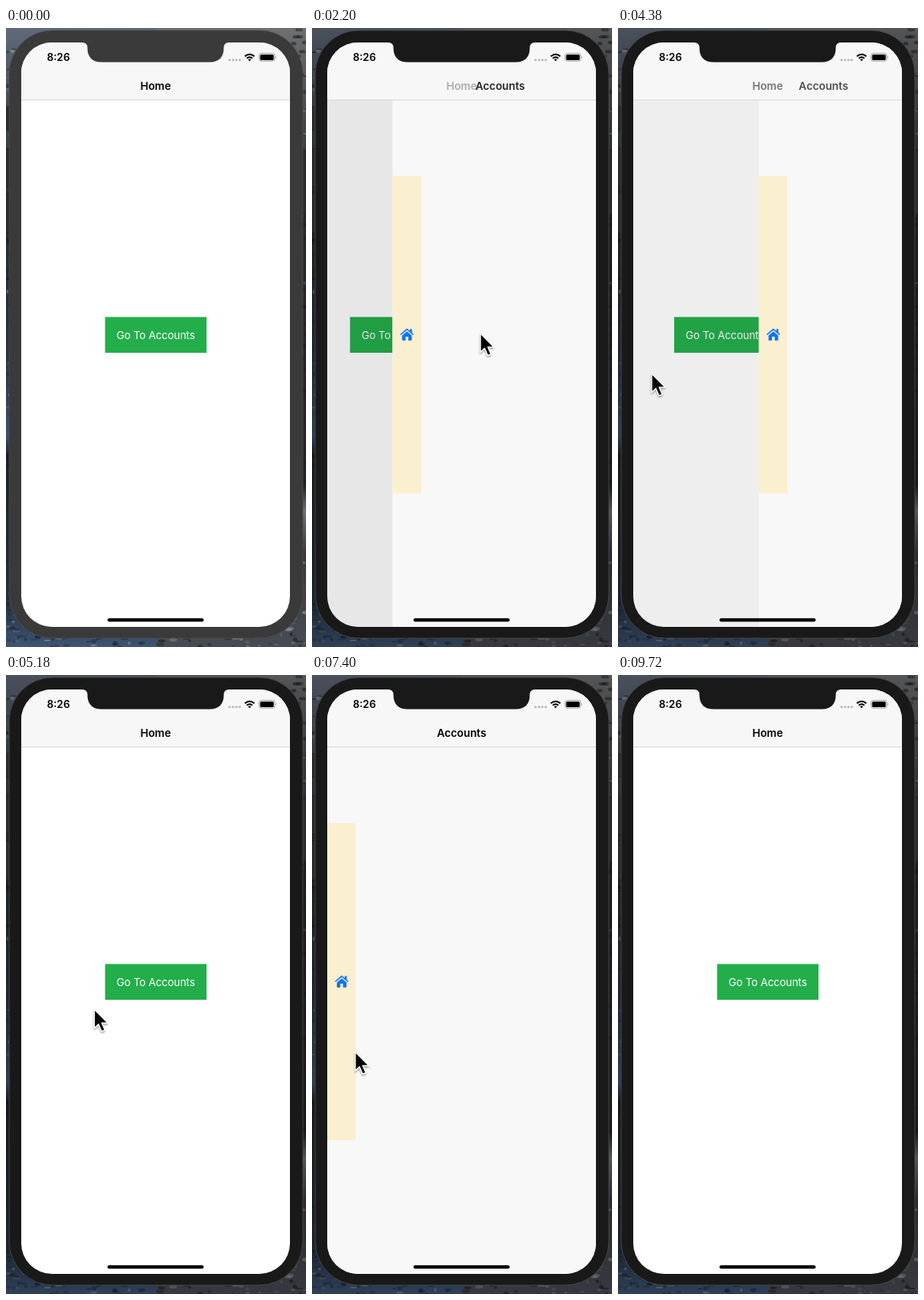
Animation of 374x770 px, one loop 9.86 s. Source, as an HTML page:

```html
<!DOCTYPE html>
<html lang="en">
<head>
<meta charset="utf-8">
<title>Accounts</title>
<style>
html, body { margin: 0; width: 100%; height: 100%; overflow: hidden; background: #222; }
svg { display: block; width: 374px; height: 770px; font-family: Inter, sans-serif; }
.title { font-size: 13.4px; font-weight: 600; text-anchor: middle; }
</style>
</head>
<body>
<svg viewBox="0 0 374 770">
  <defs>
    <linearGradient id="leftRock" x2="0" y2="1">
      <stop offset="0" stop-color="#667080"/><stop offset=".13" stop-color="#474d57"/>
      <stop offset=".3" stop-color="#2a2d33"/><stop offset=".52" stop-color="#2c3542"/>
      <stop offset=".66" stop-color="#405471"/><stop offset=".69" stop-color="#202227"/>
      <stop offset=".92" stop-color="#25303f"/><stop offset="1" stop-color="#40597a"/>
    </linearGradient>
    <linearGradient id="rightRock" x2="0" y2="1">
      <stop offset="0" stop-color="#747678"/><stop offset=".15" stop-color="#4b4b4c"/>
      <stop offset=".3" stop-color="#2b2b2c"/><stop offset=".74" stop-color="#252627"/>
      <stop offset=".78" stop-color="#777"/><stop offset=".85" stop-color="#3a3c40"/>
      <stop offset="1" stop-color="#4b5058"/>
    </linearGradient>
    <clipPath id="screen"><rect x="19" y="18" width="335" height="727" rx="38"/></clipPath>
    <filter id="shadow" x="-50%" y="-50%" width="200%" height="200%">
      <feDropShadow dx="0" dy="1.5" stdDeviation="1.3" flood-opacity=".45"/>
    </filter>
  </defs>

  <rect width="187" height="770" fill="url(#leftRock)"/>
  <rect x="187" width="187" height="770" fill="url(#rightRock)"/>
  <g id="specks"></g>
  <rect id="shade" width="374" height="770" opacity=".28"/>

  <g fill="#2b2b2c" stroke="#151515" stroke-width=".7">
    <rect x="-2" y="98" width="8" height="29"/>
    <rect x="-2" y="150" width="8" height="48"/>
    <rect x="-2" y="206" width="8" height="49"/>
    <rect x="368" y="152" width="8" height="80"/>
  </g>
  <rect id="bezel" x="4" y="3" width="366" height="756" rx="54" stroke="#505050" stroke-width=".8"/>

  <g clip-path="url(#screen)">
    <rect x="19" y="18" width="335" height="727" fill="#fff"/>
    <g id="home">
      <g id="button">
        <rect x="123.5" y="359.5" width="126.5" height="44.5" fill="#24ad4b"/>
        <text x="186.7" y="387" font-size="13.2" letter-spacing="-.12" fill="#fff" text-anchor="middle">Go To Accounts</text>
      </g>
    </g>
    <rect id="dim" x="19" y="89" width="335" height="656"/>
    <g id="accounts">
      <rect y="89" width="336" height="656" fill="#f8f8f8"/>
      <rect y="184" width="35.5" height="394.5" fill="#faefcf"/>
      <path fill="#0b75f5" d="M18 377.4l6 5.1v5.6q0 .7-.7.7h-3.6v-4.7h-3.4v4.7h-3.6q-.7 0-.7-.7v-5.6z
        M18 373.8l3.8 3.2v-2.5h2.5v4.5l2.2 1.9-1 1.2-7.5-6.4-7.5 6.4-1-1.2 7.5-6.5q.5-.6 1-.6z"/>
    </g>

    <rect x="19" y="18" width="335" height="71" fill="#f7f7f7"/>
    <rect x="19" y="89" width="335" height="1" fill="#d8d8d8"/>
    <text id="homeTitle" class="title" x="186.5" y="76.6">Home</text>
    <text id="accountsTitle" class="title" x="186.5" y="76.6">Accounts</text>

    <text x="51" y="41" font-size="12.9" font-weight="600">8:26</text>
    <g fill="#b9b9b9">
      <circle cx="278.7" cy="39.7" r="1.5"/><circle cx="283" cy="39.7" r="1.5"/>
      <circle cx="287.2" cy="39.7" r="1.5"/><circle cx="291.4" cy="39.7" r="1.5"/>
    </g>
    <g fill="none" stroke="#000" stroke-width="2">
      <path d="M297.8 35.3q5.9-5.2 11.8 0"/><path d="M300.2 37.8q3.5-3 7 0"/>
      <path fill="#000" stroke="none" d="M301.8 39.3q1.9-1.5 3.8 0l-1.9 2z"/>
    </g>
    <rect x="315.5" y="31.6" width="19.5" height="9.6" rx="2.6" fill="none" stroke="#8a8a8a" stroke-width=".8"/>
    <rect x="316.8" y="32.9" width="16.9" height="7" rx="1.5"/>
    <path d="M336 34.8q1.6 1.5 0 3.2z" fill="#8a8a8a"/>
    <rect x="126.5" y="734.3" width="120" height="4.2" rx="2.1"/>
  </g>
  <path id="notch" d="M95 16v2q6.500 0 6.500 6.500q0 18 18 18h134q18 0 18-18q0-6.500 6.500-6.500v-2z"/>

  <path id="cursor" filter="url(#shadow)" stroke="#fff" stroke-width="1.3" stroke-linejoin="round"
    d="M0 0V23.300L5.200 18.300L9.100 27.300L13 25.600L9.200 16.900H16.700Z"/>
</svg>
<script>
const $ = id => document.getElementById(id);
const LOOP = 9860, SLIDE = 500, FOCUS = 1020, WIDTH = 335;
const slides = [{ start: 2068, to: 0 }, { start: 4310, to: 1 }, { start: 6184, to: 0 }, { start: 7480, to: 1 }];
// time, x, y of the pointer tip
const pointer = [
  [100, 185, 790], [950, 210, 380], [2400, 210, 380], [3800, 42, 430], [4650, 42, 430],
  [5180, 110, 416], [5850, 193, 380], [6600, 193, 380], [7350, 54, 469], [8200, 54, 469], [9350, 25, 790]
];
const clamp = v => Math.max(0, Math.min(1, v));

function bezier(x1, y1, x2, y2) {
  const axis = (a, b, s) => 3 * (1 - s) * (1 - s) * s * a + 3 * (1 - s) * s * s * b + s ** 3;
  return x => {
    let lo = 0, hi = 1;
    for (let i = 0; i < 24; i++) {
      const mid = (lo + hi) / 2;
      if (axis(x1, x2, mid) < x) lo = mid; else hi = mid;
    }
    return axis(y1, y2, lo);
  };
}
const ease = bezier(.2833, .99, .31833, .99);

// Smooth interpolation that never overshoots its points
function track(t, axis) {
  const slope = i => i < 0 || i > pointer.length - 2 ? 0
    : (pointer[i + 1][axis] - pointer[i][axis]) / (pointer[i + 1][0] - pointer[i][0]);
  const tangent = i => {
    const a = slope(i - 1), b = slope(i);
    return a * b > 0 ? 2 * a * b / (a + b) : 0;
  };
  const last = pointer.length - 2;
  let i = 0;
  while (i < last && t > pointer[i + 1][0]) i++;
  const [p, q] = [pointer[i], pointer[i + 1]], span = q[0] - p[0], u = clamp((t - p[0]) / span);
  return p[axis] + (q[axis] - p[axis]) * u * u * (3 - 2 * u)
    + span * u * (1 - u) * (tangent(i) * (1 - u) - tangent(i + 1) * u);
}

function scatterSpecks() {
  let seed = 7, html = '';
  const random = () => (seed = seed * 16807 % 2147483647) / 2147483647;
  for (let i = 0; i < 420; i++) {
    const bottom = i > 240;
    const x = bottom ? random() * 374 : random() < .5 ? random() * 16 : 374 - random() * 16;
    const y = bottom ? 715 + random() * 55 : random() * 770;
    const light = random() < (bottom && x > 240 ? .6 : .25);
    html += `<ellipse cx="${x}" cy="${y}" rx="${1 + random() * 4}" ry="${.6 + random() * 2}"
      fill="${light ? '#a9adb1' : '#15171b'}" opacity="${.15 + random() * .4}"/>`;
  }
  $('specks').innerHTML = html;
}

function render(t) {
  let open = 1, closing = true, press = 0;
  for (const { start, to } of slides) {
    if (t >= start) {
      const k = ease(clamp((t - start) / SLIDE));
      open = to ? k : 1 - k;
      closing = to === 1;
    }
    if (!to) press += t < start ? clamp((t - start + 130) / 100) : clamp(1 - (t - start) / 120);
  }
  const move = (id, x, y = 0) => $(id).setAttribute('transform', `translate(${x} ${y})`);
  const fade = (id, v) => $(id).setAttribute('opacity', v);

  move('home', -.3 * WIDTH * (1 - open));
  move('accounts', 19 + WIDTH * open + (open > .9995 ? 2 : 0));
  fade('dim', Math.min(.1, .125 * (1 - open)));
  fade('button', 1 - .5 * press);
  fade('homeTitle', open ** .85);
  fade('accountsTitle', (1 - open) ** .6);
  move('accountsTitle', open * (closing ? 149 : 198));

  const focused = t >= FOCUS;
  for (const id of ['bezel', 'notch']) $(id).setAttribute('fill', focused ? '#191919' : '#3a3a3a');
  fade('shade', focused ? .28 : .05);
  move('cursor', track(t, 1), track(t, 2));
}

scatterSpecks();
const began = performance.now();
(function tick() {
  render((performance.now() - began) % LOOP);
  requestAnimationFrame(tick);
})();
</script>
</body>
</html>
```
